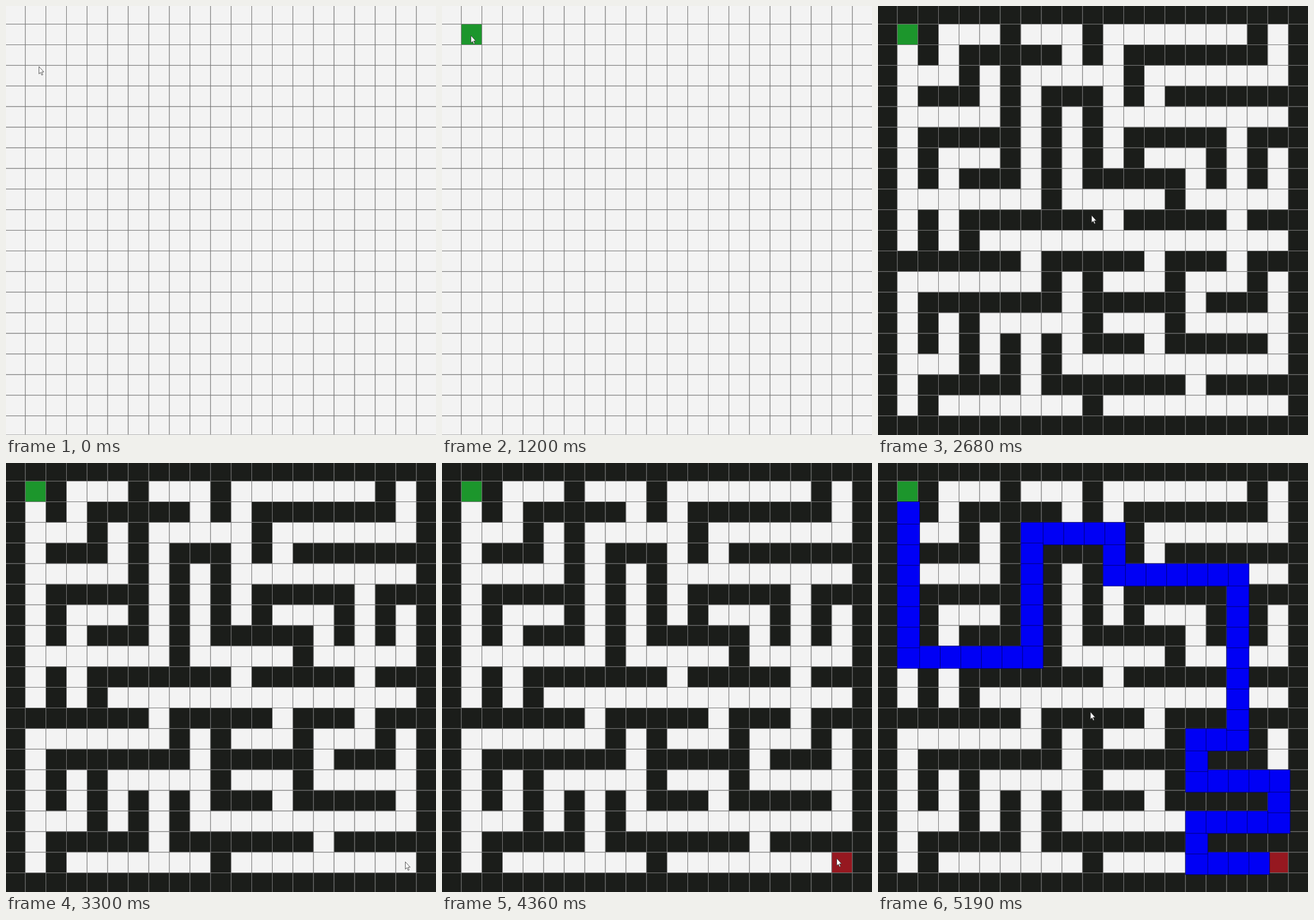
An HTML page with a canvas that plays this animation: 750 px wide and 747 px high, repeating every 6330 ms.

```html
<!DOCTYPE html>
<html lang="en">
<head>
<meta charset="utf-8">
<title>Maze solver</title>
<style>
  html, body { margin: 0; width: 100%; height: 100%; overflow: hidden; background: #f3f3f3; }
  canvas { display: block; }
</style>
</head>
<body>
<canvas id="stage" width="750" height="747"></canvas>
<script>
const ctx = document.getElementById('stage').getContext('2d');
const LOOP = 6330, PITCH = 35.9, LEFT = 33.7, TOP = 31.6;
const WALLS_AT = 2060, START_AT = 1200, END_AT = 4030, PATH_AT = 5190;
const COLORS = { floor: '#f3f3f3', wall: '#1b1d1a', line: '#787878', rim: '#b5b5b5',
                 start: '#1c962c', end: '#961820', path: '#0000f5', edge: '#000078' };

// Inner cells, rows and columns 1 to 19
const MAZE = [
  '.#...#...#.......#.',
  '.#.#####.#.#######.',
  '...#.#.....#.......',
  '.###.#.###.#.######',
  '.....#.#.#.........',
  '.#####.#.#.#####.##',
  '.#...#.#.#.#...#.#.',
  '.#.###.#.#####.#.#.',
  '.......#.....#.....',
  '.#.#######.#####.##',
  '.#.#...............',
  '######.#####.###.##',
  '.......#.#...#...#.',
  '.#######.#####.###.',
  '.#.#.....#...#.....',
  '.#.#.#.#.###.#####.',
  '...#.#.#...........',
  '.#####.#######.####',
  '.#.......#.........'
];

// Corners of the solution, from start to end
const CORNERS = [[1, 2], [1, 9], [7, 9], [7, 3], [11, 3], [11, 5], [17, 5], [17, 13],
                 [15, 13], [15, 15], [19, 15], [19, 17], [15, 17], [15, 19], [18, 19]];

const route = [CORNERS[0]];
CORNERS.slice(1).forEach(([tx, ty]) => {
  let [x, y] = route[route.length - 1];
  while (x !== tx || y !== ty) {
    x += Math.sign(tx - x);
    y += Math.sign(ty - y);
    route.push([x, y]);
  }
});

function drawCell(c, r, size, fill, stroke) {
  const box = [LEFT + PITCH * (c - 1), TOP + PITCH * (r - 1), size, size];
  ctx.lineWidth = 1;
  ctx.fillStyle = fill;
  ctx.strokeStyle = stroke;
  ctx.fillRect(...box);
  ctx.strokeRect(...box);
}

function cellColor(c, r, t) {
  if (c === 1 && r === 1 && t >= START_AT) return COLORS.start;
  if (c === 19 && r === 19 && t >= END_AT) return COLORS.end;
  const open = MAZE[r - 1] && MAZE[r - 1][c - 1] === '.';
  return open || t < WALLS_AT ? COLORS.floor : COLORS.wall;
}

function drawGrid(t) {
  for (let c = 0; c <= 20; c++)
    for (let r = 0; r <= 20; r++)
      drawCell(c, r, PITCH, cellColor(c, r, t), COLORS.line);
}

// Painted from the end back, so earlier cells overlap later ones
function drawRoute() {
  for (const [c, r] of [...route].reverse())
    drawCell(c, r, PITCH + 3, COLORS.path, COLORS.edge);
}

const ease = p => p * p * (3 - 2 * p);

// Pointer moves: first step, last step, step count, goal
const MOVES = [
  [70, 660, 6, 41, 72],
  [720, 1200, 7, 50, 51],
  [2340, 2960, 10, 693, 677],
  [3030, 3300, 5, 696, 694],
  [4360, 4360, 1, 688, 688],
  [4430, 4920, 8, 370, 433]
];

function pointerAt(t) {
  let x = 57, y = 105;
  for (const [from, to, steps, gx, gy] of MOVES) {
    if (t < from) break;
    const gap = (to - from) / Math.max(1, steps - 1);
    const done = t >= to ? steps : Math.floor((t - from) / gap) + 1;
    const p = ease(done / steps);
    x += (gx - x) * p;
    y += (gy - y) * p;
  }
  return [Math.round(x), Math.round(y)];
}

const arrow = new Path2D('M.5 .5V13.2L3.3 10.6L5.3 15.3L7.2 14.5L5.2 9.9H9Z');

function drawPointer(t) {
  const [x, y] = pointerAt(t);
  ctx.save();
  ctx.translate(x, y);
  ctx.fillStyle = '#fff';
  ctx.strokeStyle = '#333';
  ctx.lineWidth = 0.8;
  ctx.fill(arrow);
  ctx.stroke(arrow);
  ctx.restore();
}

function draw(t) {
  drawGrid(t);
  if (t < WALLS_AT) {
    ctx.fillStyle = COLORS.rim;
    ctx.fillRect(0, 746, 750, 1);
  }
  if (t >= PATH_AT) drawRoute();
  drawPointer(t);
}

const begin = performance.now();
function tick() {
  draw((performance.now() - begin) % LOOP);
  requestAnimationFrame(tick);
}
tick();
</script>
</body>
</html>
```
